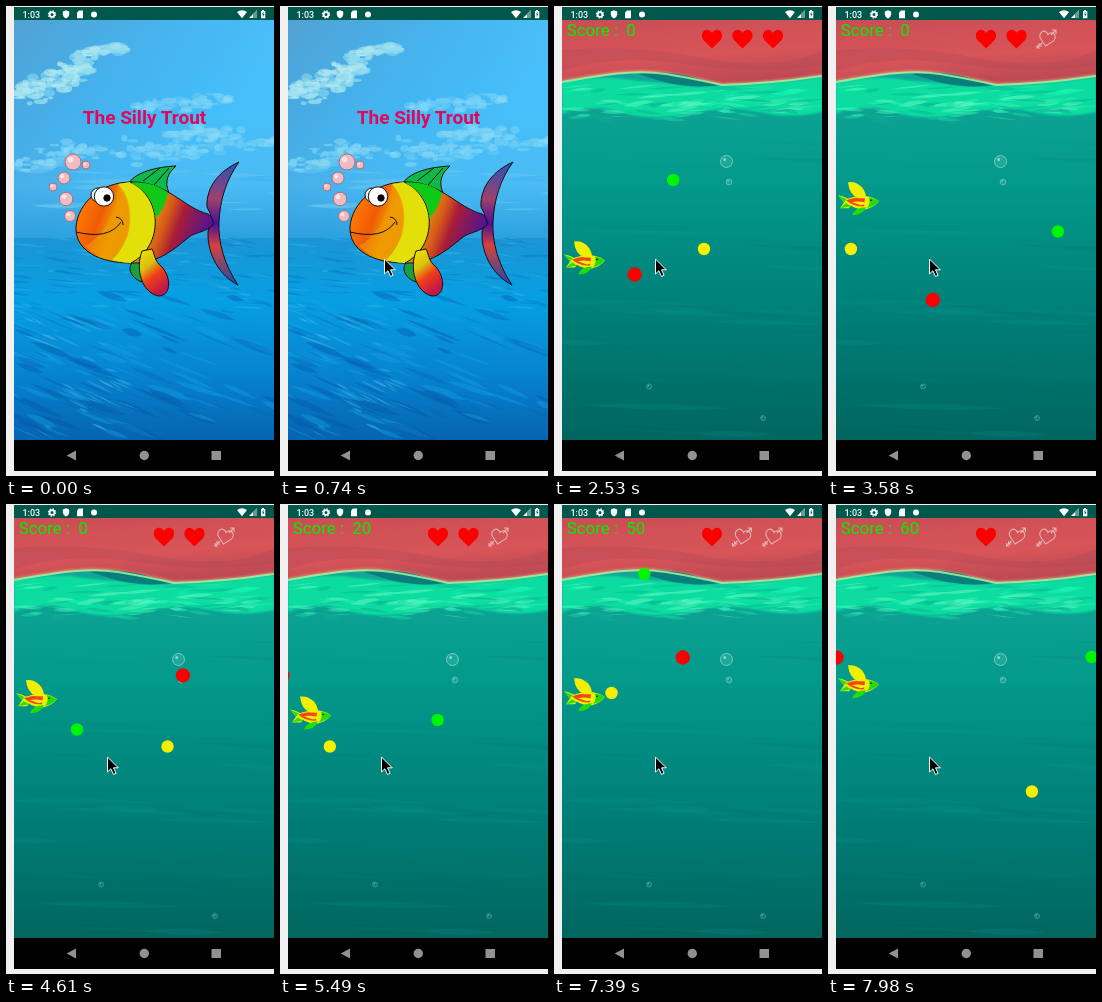
Animation, 268 px wide and 470 px high, one loop 8000 ms. Source, as an HTML page:

```html
<!DOCTYPE html>
<html lang="en">
<head>
<meta charset="utf-8">
<title>Fish game</title>
<style>
html, body { margin: 0; width: 100%; height: 100%; overflow: hidden; background: #f1f1f1; }
svg { display: block; width: 268px; height: 470px; font-family: Roboto, sans-serif; }
</style>
</head>
<body>
<svg viewBox="0 0 268 470">
  <defs>
    <linearGradient id="sky" x2="0" y2="1">
      <stop offset="0" stop-color="#4cc2fb"/><stop offset=".4" stop-color="#46bffa"/>
      <stop offset=".75" stop-color="#4bbcf3"/><stop offset="1" stop-color="#2a9fdf"/>
    </linearGradient>
    <linearGradient id="haze" x2=".7" y2=".6">
      <stop offset="0" stop-color="#5596c4" stop-opacity=".75"/><stop offset="1" stop-color="#2f9fe6" stop-opacity="0"/>
    </linearGradient>
    <linearGradient id="sea" x2="0" y2="1">
      <stop offset="0" stop-color="#1d94d3"/><stop offset=".3" stop-color="#069fe2"/>
      <stop offset=".65" stop-color="#0784cf"/><stop offset="1" stop-color="#0562b0"/>
    </linearGradient>
    <linearGradient id="dusk" x2=".25" y2="1">
      <stop offset="0" stop-color="#c94d55"/><stop offset=".6" stop-color="#d85558"/><stop offset="1" stop-color="#b94855"/>
    </linearGradient>
    <linearGradient id="water" x2="0" y2="1">
      <stop offset="0" stop-color="#12a796"/><stop offset=".3" stop-color="#03998b"/>
      <stop offset=".65" stop-color="#007f78"/><stop offset="1" stop-color="#00665f"/>
    </linearGradient>
    <linearGradient id="rainbow" gradientUnits="userSpaceOnUse" x1="78" y1="190" x2="203" y2="236">
      <stop offset="0" stop-color="#ff7a00"/><stop offset=".17" stop-color="#f05a08"/>
      <stop offset=".28" stop-color="#e8a000"/><stop offset=".5" stop-color="#d8a010"/>
      <stop offset=".64" stop-color="#d85a18"/><stop offset=".74" stop-color="#a81c38"/>
      <stop offset=".86" stop-color="#781868"/><stop offset="1" stop-color="#4a10a0"/>
    </linearGradient>
    <linearGradient id="tail" x2="0" y2="1">
      <stop offset="0" stop-color="#2a50b8"/><stop offset=".3" stop-color="#a0406c"/>
      <stop offset=".5" stop-color="#4a1098"/><stop offset=".68" stop-color="#d8403c"/><stop offset="1" stop-color="#1c4cac"/>
    </linearGradient>
    <linearGradient id="fin" x2=".5" y2="1">
      <stop offset="0" stop-color="#f0e800"/><stop offset=".4" stop-color="#d8c010"/>
      <stop offset=".65" stop-color="#f04018"/><stop offset="1" stop-color="#c01848"/>
    </linearGradient>
    <filter id="soft" x="-10%" y="-60%" width="120%" height="220%"><feGaussianBlur stdDeviation="1.1"/></filter>
    <clipPath id="phone"><rect x="8" y="1" width="260" height="464"/></clipPath>
    <clipPath id="reveal"><rect id="revealBox" x="8" y="14" width="260" height="451"/></clipPath>
    <clipPath id="board"><rect x="8" y="12" width="260" height="422"/></clipPath>
    <clipPath id="seaArea"><rect x="8" y="232" width="260" height="206"/></clipPath>
    <path id="surface" d="M8 76Q30 72 52 69Q86 64 112 68Q142 73 168 79Q215 78 268 70"/>
  </defs>

  <rect width="268" height="470" fill="#f1f1f1"/>
  <g clip-path="url(#phone)">
    <g id="intro">
      <rect x="8" y="12" width="260" height="223" fill="url(#sky)"/>
      <rect x="8" y="12" width="260" height="223" fill="url(#haze)"/>
      <g id="clouds"/>
      <rect x="8" y="232" width="260" height="206" fill="url(#sea)"/>
      <g id="waves" clip-path="url(#seaArea)"/>
      <text x="138.5" y="118" text-anchor="middle" font-size="19" font-weight="700" fill="#e0085c">The Silly Trout</text>
      <g stroke="#111" stroke-width="1" stroke-linejoin="round">
        <path d="M233 156C213 165 200 181 201 201Q209 213 202 225C201 249 214 270 232 279C218 258 212 236 213 216C214 194 220 174 233 156Z" fill="url(#tail)"/>
        <path d="M123 177C130 166 150 161 170 160C162 167 158 175 163 187Z" fill="#10b848"/>
        <path d="M137 175L154 162M148 179L163 162" fill="none"/>
        <path d="M128 254C121 261 123 271 136 276L139 256Z" fill="#18a040"/>
        <path d="M70 221C72 196 96 176 125 176C160 175 178 202 202 208Q208 212 207 219C200 226 190 226 183 231C165 246 150 258 125 257C94 257 69 245 70 221Z" fill="url(#rainbow)"/>
        <path d="M124 176C157 191 158 240 125 257C118 257 111 255 106 254C127 235 129 201 112 178Z" fill="#e2e008" stroke="none"/>
        <path d="M124 176C157 191 158 240 125 257" fill="none"/>
        <path d="M112 178C124 190 128 210 121 232L106 254Q90 251 79 240Q108 224 112 178Z" fill="#f39700" opacity=".65" stroke="none"/>
        <path d="M125 177C138 175 152 179 162 187Q158 205 149 212C149 198 141 184 125 177Z" fill="#10c818" stroke="none"/>
        <path d="M70 226Q103 234 115 216M110 211Q117 212 117 219" fill="none"/>
        <path d="M136 245C129 264 136 286 152 290C166 290 165 271 156 261C148 255 149 248 146 243Z" fill="url(#fin)"/>
        <circle cx="92" cy="189" r="7" fill="#e8f0f0"/>
        <circle cx="98" cy="190.5" r="9.7" fill="#fff"/>
        <circle cx="101" cy="192" r="3.2"/>
      </g>
      <g id="pinkBubbles" fill="#eebcc4" stroke="#b06870" stroke-width=".9"/>
      <rect id="shade" x="8" y="12" width="260" height="426" fill="#667" opacity="0"/>
    </g>
    <rect x="8" y="434" width="260" height="31"/>

    <g id="game" clip-path="url(#reveal)">
      <g id="sheet"><g clip-path="url(#board)">
        <rect x="8" y="12" width="260" height="73" fill="url(#dusk)"/>
        <path d="M8 44Q80 38 150 52T268 45V60Q200 68 130 58T8 65Z" fill="#a84858" opacity=".3"/>
        <use href="#surface" fill="none" stroke="#e8b477" stroke-width="4" opacity=".6" filter="url(#soft)"/>
        <path d="M8 76Q30 72 52 69Q86 64 112 68Q142 73 168 79Q215 78 268 70V434H8Z" fill="url(#water)"/>
        <g id="currents"/>
        <path d="M8 76Q36 71 64 72Q84 75 112 77Q142 82 165 80Q220 78 268 71V106Q238 113 205 106Q168 99 130 109Q92 115 66 106Q36 96 8 108Z" fill="#08dca0" filter="url(#soft)"/>
        <path d="M84 68Q112 63 145 73Q158 76 166 79Q140 83 110 76Z" fill="#087f7b"/>
        <g id="foam"/>
        <use href="#surface" fill="none" stroke="#a9f0a0" stroke-width="2" opacity=".85"/>
        <g id="seaBubbles" fill="#b8fff0" fill-opacity=".15" stroke="#8fccc3"/>
        <g id="balls"/>
        <g id="swimmer">
          <path d="M10 -6Q18 -5 25 1L21 7L12 7L16 1Z" fill="#d9ef08"/>
          <path d="M10 -6L19 -2L16 1ZM12 7L18 2L23 5Z" fill="#28dd10"/>
          <path d="M17 -1Q27 -6 39 -5Q46 -4 51 0Q46 6 38 8Q25 9 17 -1Z" fill="#e9ed08"/>
          <path d="M18 -1Q29 -5 37 -3L36 5Q26 6 18 -1Z" fill="#f34812"/>
          <path d="M24 1Q31 -1 40 2L33 4Z" fill="#f9ef10"/>
          <path d="M41 -4Q47 -3 51 0Q46 5 39 7Q43 2 41 -4Z" fill="#22dc08"/>
          <path d="M20 -19Q28 -20 34 -14Q38 -9 38 -3L30 -3Q21 -7 20 -19Z" fill="#f1ef00"/>
          <path d="M24 14Q27 6 38 6Q35 14 24 14Z" fill="#20df08"/>
          <circle cx="43" cy="-1" r=".8"/>
        </g>
        <g id="hearts"/>
        <text id="score" x="12.8" y="30" font-size="16.85" fill="#00f000" style="white-space:pre"></text>
      </g></g>
    </g>

    <rect x="8" y="1" width="260" height="13" fill="#00574b"/>
    <g fill="#fff">
      <text x="16.5" y="11.8" font-size="9" font-weight="500">1:03</text>
      <circle cx="46" cy="8.5" r="2.4" fill="none" stroke="#fff" stroke-width="1.8"/>
      <circle cx="46" cy="8.5" r="3.6" fill="none" stroke="#fff" stroke-width="1.2" stroke-dasharray="1.4 1.43"/>
      <path d="M60 4.3L63.2 5.6V8.4Q63 11 60 12.6Q57 11 56.8 8.4V5.6Z"/>
      <path d="M71 6.5L73 4.5H77V12.3H71Z"/>
      <circle cx="88" cy="8.5" r="3"/>
      <path d="M231 6Q236 2.3 241 6L236 12.3ZM251 4V12H243ZM255 5H256V4H258V5H259.3V12.3H255Z"/>
      <path d="M251 4V12H247V8Z" fill="#00574b" opacity=".6"/>
      <path d="M257.6 5.6L256 8.6H257L256.7 11L258.4 8H257.4Z" fill="#00574b"/>
    </g>
    <g fill="#fff" opacity=".57">
      <path d="M60.7 449.5L70 444.5V454.5Z"/><circle cx="138.3" cy="449.5" r="4.7"/><rect x="205.5" y="445" width="9.5" height="9"/>
    </g>
    <path id="cursor" d="M0 0V15L3.4 11.8L6 17.5L8.6 16.3L6 10.8H10.8Z" fill="#000" stroke="#fff" stroke-width="1"/>
  </g>
</svg>
<script>
const LOOP = 8000, GAME_START = 1640, STEP = 147.3;
const SCALE = 0.2407, LEFT = 8.2, SPAWN_X = 1101;
const $ = id => document.getElementById(id);

function add(parent, tag, attrs) {
  const node = document.createElementNS('http://www.w3.org/2000/svg', tag);
  for (const key in attrs) node.setAttribute(key, attrs[key]);
  return parent.appendChild(node);
}

function randomFrom(seed) {
  return () => (seed = (seed * 16807) % 2147483647) / 2147483647;
}

// Scenery
const rand = randomFrom(4817);
const between = (a, b) => a + (b - a) * rand();
const pick = list => list[Math.floor(rand() * list.length)];

function streaks(id, { count, x: [left, right] = [-15, 260], y: [top, bottom], w: [minW, maxW], thick, slope = 0, colors, opacity }) {
  for (let i = 0; i < count; i++) {
    const x = between(left, right), y = between(top, bottom), w = between(minW, maxW);
    const h = between(.5, thick), drop = w * slope + between(-3, 3);
    add($(id), 'path', {
      d: `M${x} ${y}q${w / 2} ${drop / 2 - h} ${w} ${drop}q${-w / 2} ${h - drop / 2} ${-w} ${-drop}Z`,
      fill: pick(colors), opacity
    });
  }
}

// Puffs scattered along a slanted line
function cloud(cx, cy, w, h, slope, count, colors, opacity = .5) {
  for (let i = 0; i < count; i++) {
    const along = between(-1, 1), across = (rand() + rand() - 1) * Math.sqrt(1 - along * along);
    add($('clouds'), 'ellipse', {
      cx: cx + along * w, cy: cy + along * w * slope + across * h,
      rx: between(2, 8), ry: between(1, 4), fill: pick(colors), opacity
    });
  }
}
const pale = ['#b9ecf2', '#a3e3f0', '#8bd8ee'], faint = ['#7fd8fa', '#6accf5', '#92dcf4'];
cloud(48, 76, 36, 20, -.35, 120, pale, .6);
cloud(92, 47, 27, 9, -.2, 50, pale, .6);
cloud(178, 97, 50, 10, -.1, 55, faint);
cloud(215, 132, 55, 15, .05, 70, faint);
cloud(42, 152, 34, 17, -.25, 60, faint);
cloud(130, 145, 70, 14, 0, 70, faint);
streaks('clouds', { count: 26, y: [165, 205], w: [30, 90], thick: 6, colors: ['#6fcaf2', '#3fb2ee'], opacity: .45 });
streaks('waves', { count: 130, y: [230, 305], w: [8, 40], thick: 3, slope: .1, colors: ['#087fc5', '#2bb2ea', '#0fa7e8'], opacity: .55 });
streaks('waves', { count: 110, y: [285, 425], w: [15, 60], thick: 8, slope: .38, colors: ['#0868b6', '#12a0e2', '#0657a6'], opacity: .42 });
streaks('waves', { count: 40, x: [0, 110], y: [300, 420], w: [8, 30], thick: 3, slope: .45, colors: ['#4fbcea', '#2fa9e2'], opacity: .55 });
streaks('currents', { count: 45, y: [115, 430], w: [60, 190], thick: 7, slope: .04, colors: ['#006f6a', '#0aa294', '#007f77'], opacity: .15 });
streaks('foam', { count: 65, x: [0, 250], y: [82, 106], w: [12, 50], thick: 5, slope: -.06, colors: ['#1cf5b4', '#00bd95', '#5cf7bf', '#12e5a6'], opacity: .55 });
streaks('foam', { count: 45, x: [0, 250], y: [93, 113], w: [10, 35], thick: 4, slope: .05, colors: ['#0cae96', '#16d6a4', '#38efb5'], opacity: .5 });

for (const [cx, cy, r] of [[67, 156, 8], [80, 159, 4], [58, 172, 6], [47, 181, 4], [60, 193, 6.8], [64, 210, 5.5]]) {
  add($('pinkBubbles'), 'circle', { cx, cy, r });
  add($('pinkBubbles'), 'circle', { cx: cx - r * .3, cy: cy - r * .3, r: r * .35, fill: '#fbe5e7', stroke: 'none' });
}
for (const [cx, cy, r] of [[172.5, 155.5, 6], [175, 176, 2.9], [95, 380.5, 2.5], [209, 412, 2.5]]) {
  add($('seaBubbles'), 'circle', { cx, cy, r, 'stroke-width': r > 5 ? 1 : .7, opacity: cy > 300 ? .55 : .9 });
  add($('seaBubbles'), 'circle', { cx: cx - r * .3, cy: cy - r * .35, r: r * .25, stroke: 'none', 'fill-opacity': .6 });
}

// Each flight is [tick before launch, y]
const balls = [
  { color: '#f6f000', speed: 16, r: 6.2, points: 10, hits: [132, 190], flights: [[0, 243], [69, 242.5], [132, 189], [190, 287.5]] },
  { color: '#00f500', speed: 20, r: 6.2, points: 20, hits: [103, 150], flights: [[0, 174], [56, 225.5], [103, 216], [150, 70], [206, 153]] },
  { color: '#fa0000', speed: 25, r: 7.2, points: 0, hits: [37, 164], flights: [[0, 268.5], [37, 294], [82, 171.5], [127, 150], [164, 153.5]] }
];
for (const ball of balls) ball.node = add($('balls'), 'circle', { r: ball.r, fill: ball.color });

const HEART = 'M0 9.5L-8.2 1.5C-13-4-8-11.5-2.5-8.5Q-1-7.8 0-6Q1-7.8 2.5-8.5C8-11.5 13-4 8.2 1.5Z';
const hearts = [158, 188.5, 219].map(x => {
  const slot = add($('hearts'), 'g', { transform: `translate(${x} 33)` });
  const full = add(slot, 'path', { d: HEART, fill: '#fc0000' });
  const empty = add(slot, 'g', { fill: 'none', stroke: '#e5b4b1', 'stroke-width': 1.1 });
  add(empty, 'path', { d: HEART, transform: 'rotate(12) scale(.76)', 'stroke-width': 1.4 });
  add(empty, 'path', { d: 'M-10 9L-5 4M-10 6V9H-7M-8 4V7H-5M4-4L9-9M5-9H9V-5' });
  return { full, empty };
});

const taps = [21, 37, 47, 61, 76, 104, 108, 131, 147, 151, 155, 159, 186, 189];
function swimmerY(tick) {
  let y = 0, speed = 8;
  for (let i = 5; i <= tick; i++) {
    if (taps.includes(i - 1)) speed = -22;
    speed += 2;
    y += speed;
  }
  return 174.5 + y * SCALE;
}

// Game ticks reached at given screen refreshes
const pace = [[0, 4], [6, 32], [20, 98], [26, 127], [34, 164], [43, 208]];
function tickAt(step) {
  const i = Math.max(1, pace.findIndex(p => p[0] >= step));
  const [s0, n0] = pace[i - 1], [s1, n1] = pace[i];
  return Math.round(n0 + (n1 - n0) * (step - s0) / (s1 - s0));
}

const show = (node, on) => node.setAttribute('display', on ? 'inline' : 'none');
const move = (node, x, y) => node.setAttribute('transform', `translate(${x} ${y})`);

function drawCursor(t, step) {
  show($('cursor'), t >= 450);
  const [x, y] = t < 590 ? [207, 449] : t < 740 ? [143, 330] : [step >= 1 ? 101.5 : 104.5, 253];
  move($('cursor'), x, y);
}

function drawGame(step) {
  const tick = tickAt(step);
  const [clip, offset] = step === 0 ? [176, 16.5] : step === 1 ? [22, 2] : [14, 0];
  $('revealBox').setAttribute('y', clip);
  move($('sheet'), 0, offset);

  let score = 0, lives = 3;
  for (const ball of balls) {
    const hits = ball.hits.filter(h => h <= tick).length;
    score += hits * ball.points;
    if (!ball.points) lives -= hits;
    const [start, y] = ball.flights.filter(f => f[0] < tick).pop();
    ball.node.setAttribute('cx', LEFT + (SPAWN_X - ball.speed * (tick - start)) * SCALE);
    ball.node.setAttribute('cy', y);
    show(ball.node, !ball.hits.includes(tick));
  }
  hearts.forEach((heart, i) => {
    show(heart.full, i < lives);
    show(heart.empty, i >= lives);
  });
  $('score').textContent = 'Score :\u00a0\u00a0' + score;
  move($('swimmer'), 0, swimmerY(tick));
}

function render(t) {
  const step = Math.min(43, Math.floor((t - GAME_START) / STEP));
  const playing = step >= 0;
  show($('game'), playing);
  move($('intro'), 0, playing ? -1.3 : 0);
  $('shade').setAttribute('opacity', playing ? .12 : 0);
  drawCursor(t, step);
  if (playing) drawGame(step);
}

const began = performance.now();
function loop() {
  render((performance.now() - began) % LOOP);
  requestAnimationFrame(loop);
}
loop();
</script>
</body>
</html>
```
